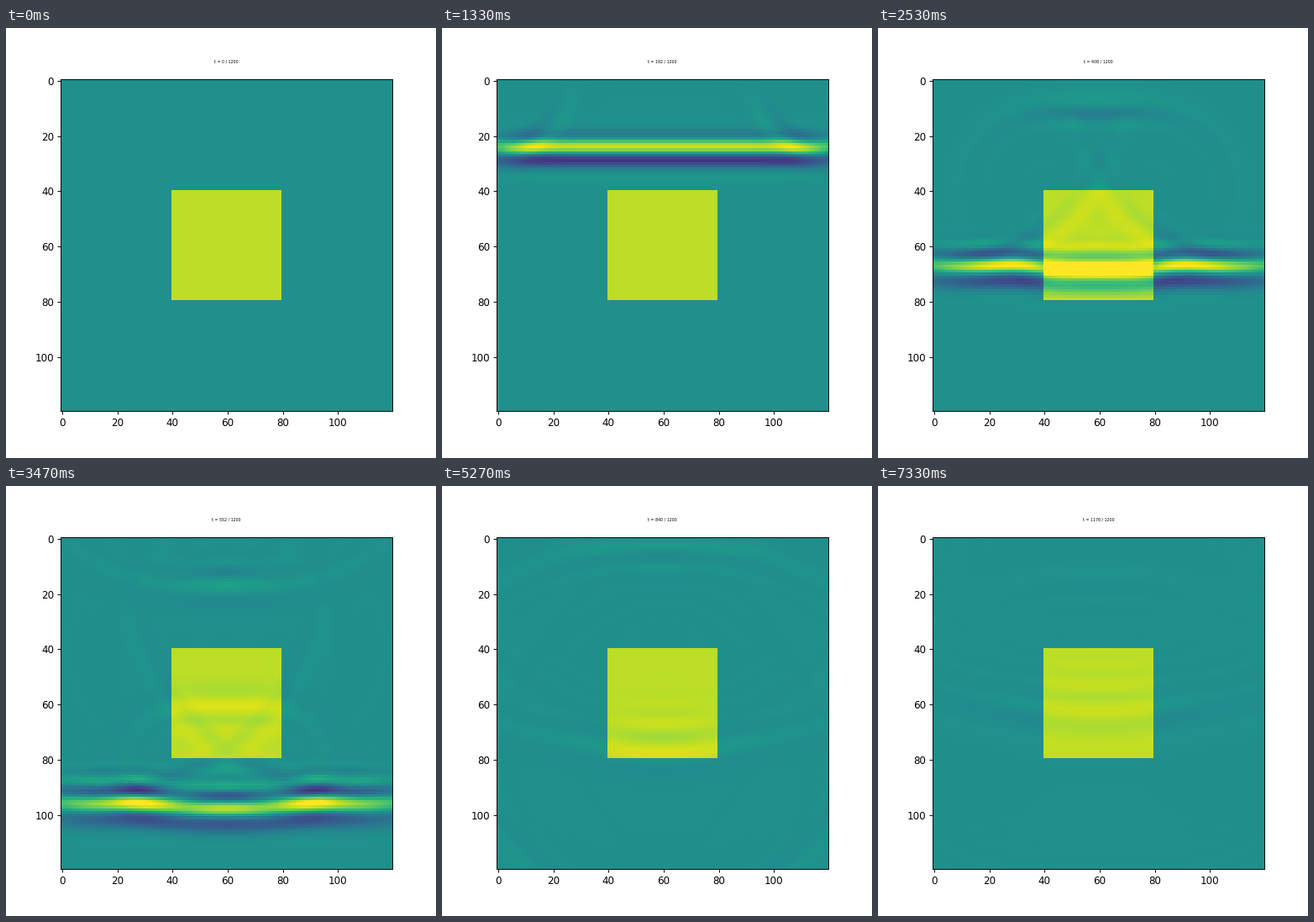
A matplotlib script for the animation above (7.54 s loop, 512x512 px).

```python
import numpy as np
import matplotlib.pyplot as plt
from matplotlib.animation import FuncAnimation

N, PAD = 120, 50            # visible cells, absorbing margin
STEPS, EVERY = 1200, 24
COURANT = 0.2035
BLOCK = slice(40, 80)
T0, PERIOD, WIDTH = 60, 60, 27

LOOP, TICK = 7540, 29       # ms


def pulse(t):
    s = t - T0
    return np.sin(2 * np.pi * s / PERIOD) * np.exp(-(s / WIDTH) ** 2)


def simulate():
    """Plane pulse sent down from the top row through a stiffer block."""
    rows, cols = N + PAD, N + 2 * PAD
    view = (slice(0, N), slice(PAD, PAD + N))

    mask = np.zeros((rows, cols))
    mask[BLOCK, PAD + BLOCK.start:PAD + BLOCK.stop] = 1
    beta = 1 + 0.386 * mask
    kappa = COURANT ** 2 * (1 - 0.205 * mask[1:-1, 1:-1])
    beta_y = (beta[1:, 1:-1] + beta[:-1, 1:-1]) / 2
    beta_x = (beta[1:-1, 1:] + beta[1:-1, :-1]) / 2

    y, x = np.mgrid[:rows, :cols]
    depth = np.maximum.reduce([PAD - x, x - PAD - N + 1, y - N + 1, 0 * x])
    damp = 0.06 * (depth[1:-1, 1:-1] / PAD) ** 2
    gain, keep = 1 / (1 + damp), 1 - damp

    u = np.zeros((rows, cols))
    prev = u.copy()
    shots = []
    for t in range(STEPS):
        u[0, view[1]] = pulse(t)
        if t % EVERY == 0:
            shots.append(u[view] + 0.8 * mask[view])
        flow_y = beta_y * np.diff(u[:, 1:-1], axis=0)
        flow_x = beta_x * np.diff(u[1:-1], axis=1)
        force = kappa * (np.diff(flow_y, axis=0) + np.diff(flow_x, axis=1))
        mid = prev[1:-1, 1:-1]
        mid[:] = gain * (2 * u[1:-1, 1:-1] - keep * mid + force)
        u, prev = prev, u
    return shots


shots = simulate()

# Shots come every 150 ms, snapped to a 15 fps clock.
starts = np.floor(np.arange(len(shots)) * 2.25 + 0.5) * 1000 / 15

fig, ax = plt.subplots(figsize=(6, 6), dpi=512 / 6)
image = ax.imshow(shots[0], vmin=-1, vmax=1, cmap="viridis")
label = ax.text(0.5, 1.05, "", size=4, ha="center", transform=ax.transAxes)


def update(i):
    k = np.searchsorted(starts, (i + 1) * TICK - 1, side="right") - 1
    image.set_data(shots[k])
    label.set_text(f"t = {k * EVERY} / {STEPS}")
    return image, label


anim = FuncAnimation(fig, update, frames=LOOP // TICK, interval=TICK,
                     repeat=True, repeat_delay=0)
plt.show()
```
